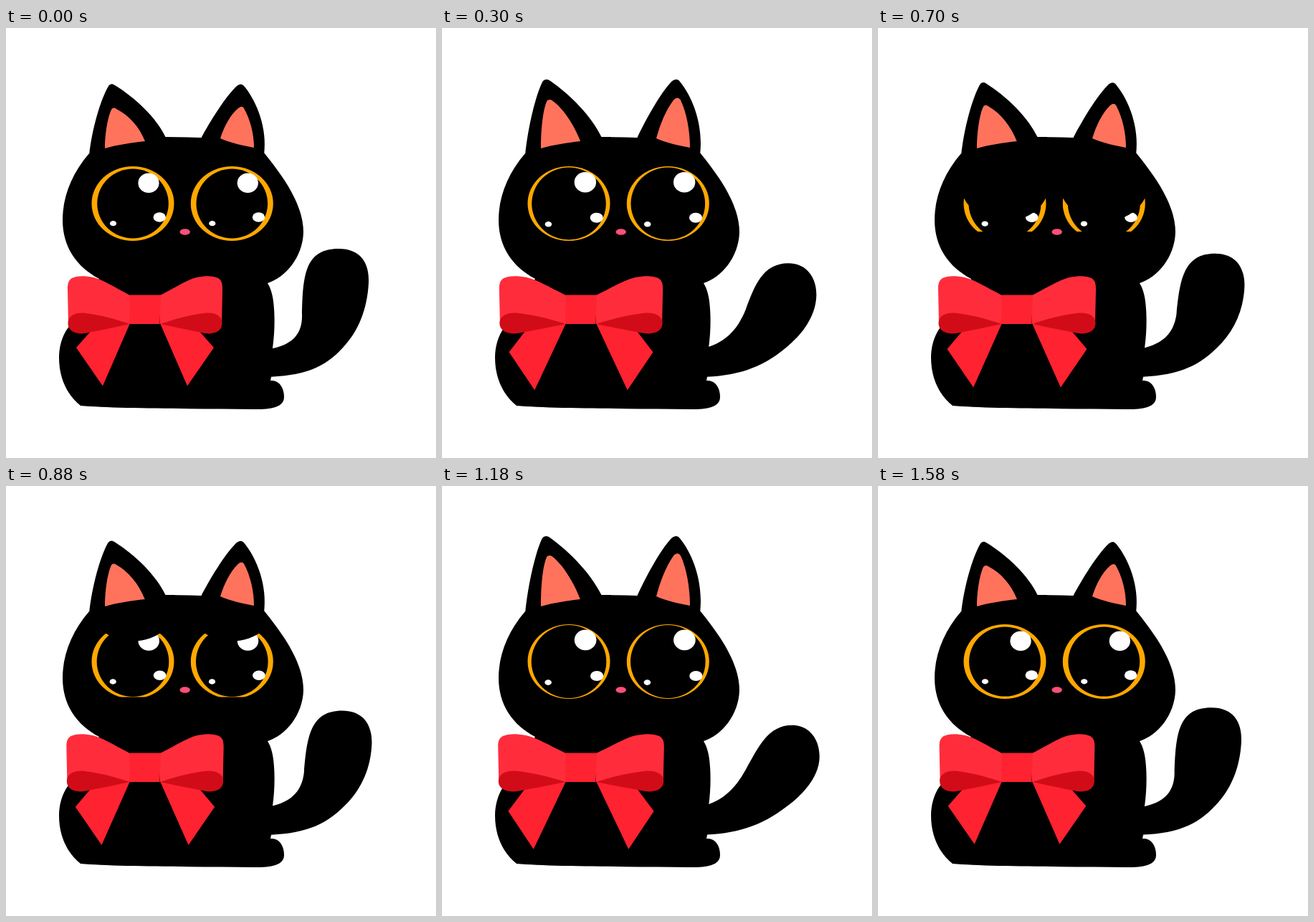
Animation of 600 by 600 pixels, one loop 1600 ms. Source, as an HTML page:

```html
<!DOCTYPE html>
<html lang="en">
<head>
<meta charset="utf-8">
<title>Black cat</title>
<style>
  html, body { margin: 0; height: 100%; overflow: hidden; background: #fff; }
  svg { display: block; width: 100%; height: 100%; }
</style>
</head>
<body>
<svg viewBox="0 0 600 600">
  <defs>
    <clipPath id="socket"><ellipse cx="177" cy="245" rx="59" ry="53.5"/></clipPath>
    <g id="eye" clip-path="url(#socket)">
      <ellipse cx="177" cy="245" rx="57.5" ry="52" fill="#ffa800"/>
      <g id="pupil" fill="#fff">
        <ellipse rx="49.8" ry="48.5" fill="#000"/>
        <ellipse cx="22" cy="-28.7" rx="14.6" ry="13.7"/>
        <ellipse cx="37.2" cy="19" rx="8.7" ry="6.7"/>
        <ellipse cx="-27.5" cy="27.7" rx="4.6" ry="3.6"/>
      </g>
      <ellipse id="upperLid" cx="177" rx="62" ry="53"/>
      <rect id="lowerLid" x="117" width="120" height="60"/>
    </g>
    <g id="halfBow">
      <path id="ribbon" fill="#ff2231"/>
      <g id="loop">
        <path fill="#ff2d3c" d="M173 373C150 361 135 351 122 348C108 345 98 346 92 349C87 352 86 357 86 364L87 412L173 413Z"/>
        <path fill="#d10c18" d="M86.500 411C87 400 100 396 112 398C135 401 152 406 173 413C150 418 130 422 110 426C96 428 86 422 86.500 411Z"/>
      </g>
    </g>
  </defs>

  <path id="tail"/>
  <path id="earL"/>
  <path id="earR"/>
  <path d="M116 175C92 203 79 235 79 268C79 305 98 333 130 350L100 400L84 422C78 432 74 445 74 460C74 488 85 512 104 527C150 531 250 531 345 532C372 533 388 528 388 515C388 500 380 491 369 492L370 487L372 447C375 425 375 405 374 392C373 375 370 364 365 356C390 348 414 320 415 285C415 245 385 205 360 174L272 153Q247 152 222 152Z"/>
  <path id="innerL" fill="#ff735c"/>
  <path id="innerR" fill="#ff735c"/>
  <use href="#eye"/>
  <use href="#eye" x="138.300"/>
  <ellipse cx="249.700" cy="284.500" rx="7.200" ry="4.300" fill="#ff4f78"/>
  <use href="#halfBow"/>
  <use href="#halfBow" transform="translate(388) scale(-1 1)"/>
  <path fill="#ff2231" d="M173 372.500H216L214.500 413H172Z"/>
</svg>
<script>
const LOOP = 1600, SWING = 800, STRETCH = 340;
const $ = id => document.getElementById(id);

// Each shape: relaxed pose, stretched pose
const poses = {
  tail: [
    'M360 449C395 445 413 431 413 402C414 345 417 308 464 308C494 308 507 327 506 355C504 394 491 424 470 446C445 474 415 486 360 487Z',
    'M360 448C395 440 412 420 425 392C439 362 451 331 486 331C510 331 525 350 524.5 376C524 402 506 427 480 447C445 475 410 486 360 487Z'],
  earL: [
    'M116 178C120 140 132 100 143 81C145 78 148 77 152 80C180 97 210 125 223 153L200 190Z',
    'M116 178C120 137 131 92 140 74C143 70 147 70 151 73C178 92 208 122 223 153L200 190Z'],
  earR: [
    'M272 154C285 130 306 96 322 81C326 78 329 77 333 82C350 103 365 140 360 177L300 190Z',
    'M272 154C283 130 304 91 320 74C325 70 329 70 332 74C350 96 365 135 360 177L300 190Z'],
  innerL: [
    'M138 168C138 148 142 124 147 114C149 111 151 111 154 113C172 122 186 138 194 158C175 160 155 163 138 168Z',
    'M138 168C138 145 140 115 146 101C148 98 151 98 154 100C168 110 184 134 193 158C175 160 155 163 138 168Z'],
  innerR: [
    'M299 154C304 138 313 121 324 112C328 109 330 109 332 112C341 128 346 148 346 167C330 164 313 160 299 154Z',
    'M299 154C304 135 312 114 323 99C327 95 330 95 333 99C341 116 346 142 346 167C330 164 313 160 299 154Z'],
  ribbon: [
    'M121 420L98 446L135 499.5L173 412Z',
    'M118 420L93 453L128.500 506L173 412Z']
};

function morph([from, to], k) {
  const ends = to.match(/[\d.]+/g);
  let i = 0;
  return from.replace(/[\d.]+/g, n => (+n + (ends[i++] - n) * k).toFixed(2));
}

function draw() {
  const t = performance.now() % LOOP;
  const phase = t % SWING;
  const k = Math.min(phase, SWING - phase) / STRETCH;
  const blink = Math.max(0, 1 - Math.abs(t - 750) / 167);

  for (const id in poses) $(id).setAttribute('d', morph(poses[id], k));
  $('loop').setAttribute('transform', `translate(173) scale(${1 + 0.08 * k} 1) translate(-173)`);
  $('pupil').setAttribute('transform', `translate(177 245) scale(${1 + 0.045 * k})`);
  $('upperLid').setAttribute('cy', 140 + 108.6 * blink);
  $('lowerLid').setAttribute('y', 299 - 21 * blink);
  requestAnimationFrame(draw);
}
draw();
</script>
</body>
</html>
```
